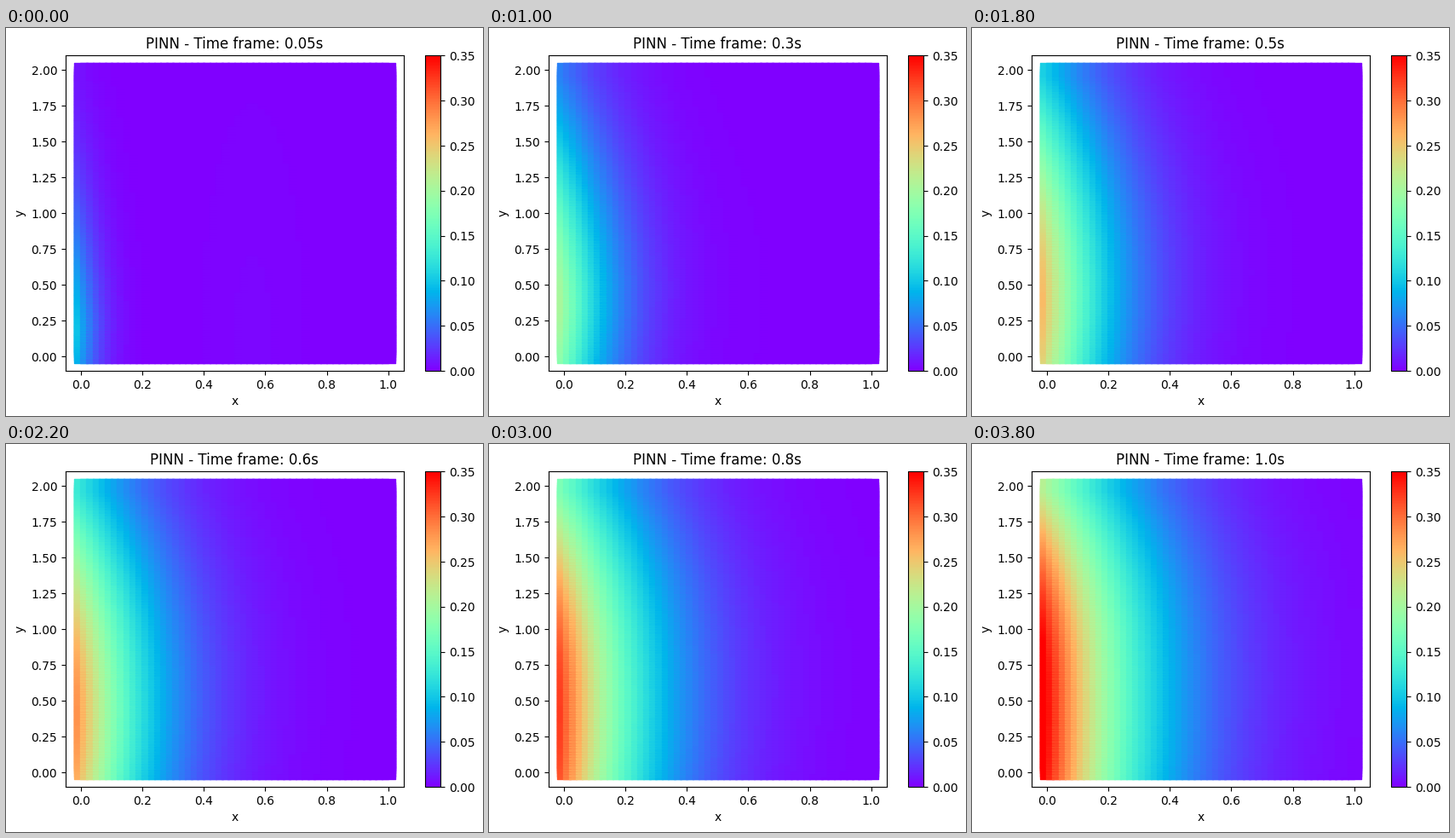
A matplotlib script for the animation above (4 s loop, 560 by 455 pixels).

```python
import numpy as np
import matplotlib.pyplot as plt
from matplotlib.animation import FuncAnimation

W, H, DPI = 560, 455, 100
FRAMES, INTERVAL = 20, 200
DIFF = 0.098  # diffusivity

x, y = (g.ravel() for g in np.meshgrid(np.linspace(0, 1, 51),
                                       np.linspace(0, 2, 101)))


def ierfc(z):
    """Integral of exp(-s^2) / s^2 type decay, scaled to 1 at z = 0."""
    s = np.linspace(0, 4, 400)
    tail = np.exp(-s * s)
    erfc = 1 - np.cumsum(tail) / tail.sum()
    return np.exp(-z * z) - np.sqrt(np.pi) * z * np.interp(z, s, erfc)


def field(t):
    """Diffusion from a flux on the left wall, spreading along y with time."""
    peak = 0.36 * np.sqrt(t) + 0.02 * np.exp(-4 * t)
    mid = 0.45 - 0.3 * np.exp(-6 * t) + 0.3 * x
    drop = 0.64 / (t + 0.22) * (1 + 0.3 * x)
    shape = np.abs((y - mid) / (2 - mid)) ** (1.4 + 1.1 * t)
    heat = peak * np.exp(-drop * shape) * ierfc(x / np.sqrt(4 * DIFF * t))
    ripple = 0.004 * np.exp(-5.5 * t
                            - ((x - 0.55 - 0.4 * t) / 0.185) ** 2
                            - ((y - 0.15) / 1.85) ** 2)
    return heat + ripple


def place(left, top, width, height):
    return fig.add_axes([left / W, 1 - (top + height) / H,
                         width / W, height / H])


fig = plt.figure(figsize=(W / DPI, H / DPI), dpi=DPI, facecolor="white")
ax = place(69.9, 32.42, 396.8, 369.6)
cax = place(491.5, 32.42, 18.48, 369.6)

dots = ax.scatter(x, y, c=field(0.05), s=132, marker="s",
                  cmap="rainbow", vmin=0, vmax=0.35)
ax.set(xlim=(-0.05, 1.05), ylim=(-0.1, 2.1), xlabel="x", ylabel="y")
title = ax.set_title("")
fig.colorbar(dots, cax=cax)


def update(i):
    t = round(0.05 * (i + 1), 2)
    dots.set_array(field(t))
    title.set_text(f"PINN - Time frame: {t}s")
    return dots, title


anim = FuncAnimation(fig, update, frames=FRAMES, interval=INTERVAL,
                     repeat=True, repeat_delay=0, blit=False)
plt.show()
```
